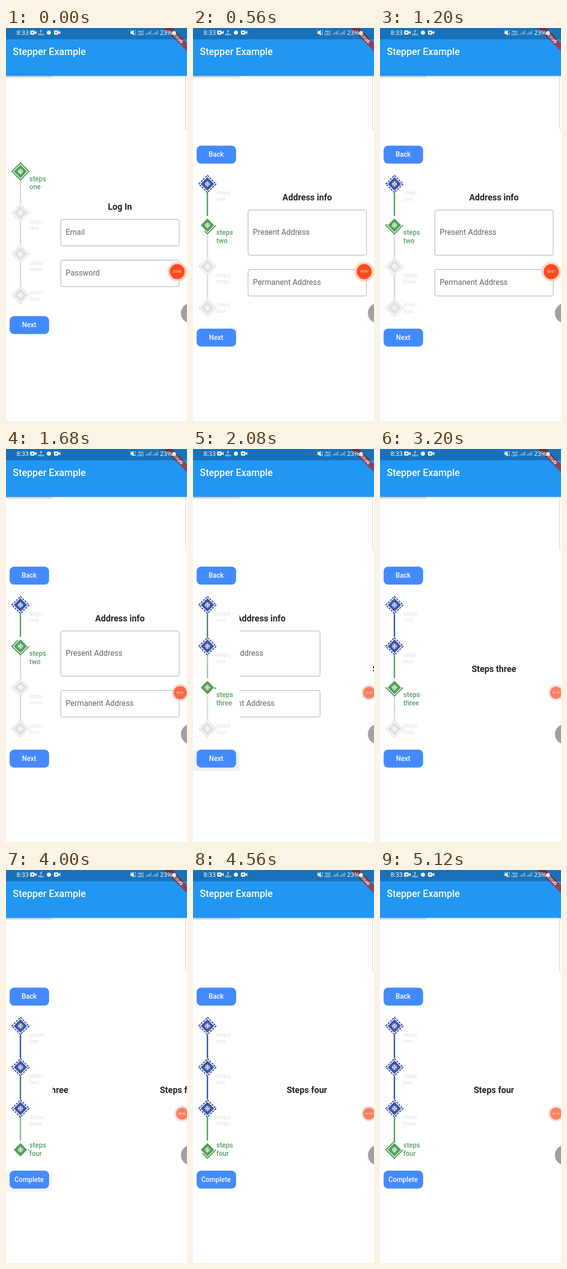
Write an HTML page that moves like this. It is 370 px wide and 800 px high and loops after 5.2 s.

```html
<!DOCTYPE html>
<html lang="en">
<head>
<meta charset="utf-8">
<title>Stepper Example</title>
<style>
  html, body { margin: 0; width: 100%; height: 100%; overflow: hidden; background: #fff; }
  svg { display: block; width: 370px; height: 800px; font-family: Roboto, sans-serif; }
  .heading { font-size: 17.7px; font-weight: 700; text-anchor: middle; fill: #262626; }
  .field rect { fill: none; stroke: #a3a3a3; }
  .field text { font-size: 15.8px; fill: #5f6b64; }
  .button rect { fill: #448aff; }
  .button text { font-size: 13.9px; font-weight: 500; text-anchor: middle; fill: #fff; }
  .label { font-size: 11.5px; fill: #e0e0e0; }
  .label.active { font-size: 13.8px; font-weight: 500; fill: #5c9c66; }
  .tiny { font-size: 5.5px; font-weight: 500; }
</style>
</head>
<body>
<svg viewBox="0 0 370 800">
  <defs>
    <clipPath id="pageArea"><rect x="95" y="98" width="275" height="702"/></clipPath>
    <linearGradient id="shade" x2="0" y2="1">
      <stop stop-color="#bdbdbd"/><stop offset="1" stop-color="#fff"/>
    </linearGradient>
    <g id="snow" fill="none" stroke="#fff" stroke-width="1.8">
      <path id="arm" d="M0 0V-10M-4.7-7.7L0-3L4.7-7.7"/>
      <use href="#arm" transform="rotate(90)"/>
      <use href="#arm" transform="rotate(180)"/>
      <use href="#arm" transform="rotate(270)"/>
    </g>
    <g id="camera">
      <rect y="5" width="9" height="8.5" rx="1.5"/><path d="M8 9.2L13 5.7V12.7Z"/>
      <circle cx="4.5" cy="9.2" r="1.7" fill="#1b74b8"/>
    </g>
    <path id="signal" d="M0 13.5V11.5M2.5 13.5V10M5 13.5V8.5M7.5 13.5V7M10 13.5V5" stroke="#fff" stroke-width="1.2" opacity=".65"/>
  </defs>

  <rect width="370" height="800" fill="#fff"/>
  <path d="M371 97H367V203Q367 207 371 207" fill="none" stroke="#c8c8c8"/>
  <g clip-path="url(#pageArea)"><g id="pages"></g></g>

  <rect id="ripple" y="612" width="95" height="43" rx="3" fill="#ececec"/>
  <g id="back" class="button">
    <rect x="7.4" y="239.6" width="80.7" height="36.5" rx="9"/><text x="47.3" y="262.4">Back</text>
  </g>
  <g id="stepper">
    <g id="steps"></g>
    <g class="button">
      <rect x="7.4" y="612" width="80.7" height="36.5" rx="9"/><text id="next" x="47.3" y="634.8"></text>
    </g>
  </g>

  <rect y="97" width="95" height="6" fill="url(#shade)"/>
  <rect x="95" y="97" width="275" height="1.6" fill="#c3d9ea"/>
  <rect width="370" height="97.4" fill="#2196f3"/>
  <text x="14" y="55" font-size="19.7" font-weight="500" fill="#fff">Stepper Example</text>
  <g transform="translate(370 0) rotate(45)">
    <rect x="-40" y="21.5" width="80" height="12" fill="#b0272c" opacity=".74"/>
    <text y="30.8" font-size="8.8" font-weight="900" text-anchor="middle" fill="#fff">DEBUG</text>
  </g>
  <rect width="370" height="23" opacity=".24"/>

  <g fill="#fff">
    <text x="21.5" y="14" font-size="12.6" font-family="Noto Sans, sans-serif">8:33</text>
    <use href="#camera" x="49.5"/>
    <text class="tiny" x="69.5" y="9" style="font-size:7px">0</text>
    <text class="tiny" x="66" y="15">KB/s</text>
    <circle cx="87.7" cy="9.5" r="4.3"/>
    <use href="#camera" x="98"/>
    <path d="M254.5 7H257L261 4V15L257 12H254.5Z"/>
    <path d="M254 4L264 14.5M263 6L265.5 5M263.5 9.2H266M263 12L265.5 13" stroke="#fff"/>
    <text class="tiny" x="270" y="8.5" style="font-size:6px">Vo))</text>
    <text class="tiny" x="269" y="15" style="font-size:6px">LTE1</text>
    <use href="#signal" x="286"/><use href="#signal" x="300"/>
    <text x="315" y="14" font-size="12.6" font-family="Noto Sans, sans-serif">23%</text>
    <circle cx="343.5" cy="10" r="4" opacity=".85"/>
  </g>

  <circle cx="377.7" cy="580.5" r="20.2" fill="#a0a0a3"/>
  <g id="recorder">
    <circle id="halo" r="20" fill="#fbd5c2"/>
    <circle r="15.3" fill="#ff4a1c"/>
    <text id="clock" y="2.4" font-size="6.7" text-anchor="middle" fill="#fff"></text>
  </g>
</svg>

<script>
const LOOP = 5200, SLIDE = 400, PAGE_WIDTH = 274;
const TAPS = [180, 2005, 3869];
const NAMES = ['one', 'two', 'three', 'four'];
const GREY = [218, 218, 218], GREEN = [82, 160, 88], BLUE = [60, 84, 165];
const RADIUS = 17.4, PERIMETER = RADIUS * 4 * Math.SQRT2;
// Border growth of each active step: [time, share of the outline]
const BORDERS = [
  [[0, 1], [180, 1]],
  [[180, 0], [560, .33], [1200, .53], [2005, .78]],
  [[2005, 0], [2080, .04], [3200, .5], [3869, .77]],
  [[3869, 0], [4000, .02], [5120, .77], [5200, .82]]
];

const byId = id => document.getElementById(id);
const clamp = x => Math.max(0, Math.min(1, x));
const rgb = c => `rgb(${c.map(Math.round)})`;
const mix = (a, b, k) => a.map((v, i) => v + (b[i] - v) * k);
const easeOut = x => 1 - (1 - clamp(x)) ** 2;

function sample(keys, t) {
  const i = Math.max(1, keys.findIndex(k => k[0] >= t));
  const [t0, v0] = keys[i - 1], [t1, v1] = keys[i];
  return v0 + (v1 - v0) * clamp((t - t0) / (t1 - t0));
}

const diamond = r => `M${r} 0L0 ${r}L${-r} 0L0 ${-r}Z`;
const heading = (text, y) => `<text class="heading" x="232.8" y="${y}">${text}</text>`;
const field = (text, y, height) => `<g class="field">
  <rect x="112" y="${y}" width="242" height="${height}" rx="3.5"/>
  <text x="122" y="${y + height / 2 + 4}">${text}</text></g>`;

byId('pages').innerHTML = [
  heading('Log In', 370) + field('Email', 389.5, 54) + field('Password', 472.5, 54),
  heading('Address info', 351) + field('Present Address', 370.5, 92) + field('Permanent Address', 491.5, 54),
  heading('Steps three', 453.5),
  heading('Steps four', 453.5)
].map((page, i) => `<g transform="translate(${i * PAGE_WIDTH})">${page}</g>`).join('');

byId('steps').innerHTML = NAMES.map((name, i) => `
  <g transform="translate(29.5 ${317.5 + 84 * i})">
    ${i < 3 ? '<path class="line" d="M0 19.5V64" stroke-width="2.8" stroke-linecap="round"/>' : ''}
    <path class="border" d="${diamond(RADIUS)}" fill="none" stroke-width="2.4"/>
    <path class="body" d="${diamond(13.7)}"/>
    <use href="#snow" transform="scale(.6)"/>
    <text class="label"><tspan x="18.3">steps</tspan><tspan x="18.3">${name}</tspan></text>
  </g>`).join('');

const steps = [...byId('steps').children].map(g => ({
  line: g.querySelector('.line'), border: g.querySelector('.border'),
  body: g.querySelector('.body'), label: g.querySelector('.label'),
  rows: g.querySelectorAll('tspan')
}));

function drawStep(step, i, current, position, t) {
  const active = i === current;
  const color = rgb(active ? GREEN : i < current ? BLUE : [224, 224, 224]);
  step.body.setAttribute('fill', color);
  step.border.setAttribute('stroke', color);
  step.border.setAttribute('stroke-dasharray',
    active ? `${sample(BORDERS[i], t) * PERIMETER} ${PERIMETER}` : '4 2.15');

  step.label.classList.toggle('active', active);
  const top = (active ? 19.8 : 21.5) - (i === 3 ? 24 : 0);
  step.rows[0].setAttribute('y', top);
  step.rows[1].setAttribute('y', top + (active ? 16.2 : 13.3));

  if (step.line) {
    const done = position - i;
    step.line.setAttribute('stroke', rgb(done < 1
      ? mix(GREY, GREEN, clamp(done)) : mix(GREEN, BLUE, clamp(done - 1))));
  }
}

function render(t) {
  const current = TAPS.filter(tap => t >= tap).length;
  const position = TAPS.reduce((sum, tap) => sum + easeOut((t - tap) / SLIDE), 0);
  const sinceTap = current ? t - TAPS[current - 1] : Infinity;

  byId('pages').setAttribute('transform', `translate(${-position * PAGE_WIDTH})`);
  byId('stepper').setAttribute('transform', `translate(0 ${current ? 0 : -25.5})`);
  byId('back').setAttribute('visibility', current ? 'visible' : 'hidden');
  byId('next').textContent = current === 3 ? 'Complete' : 'Next';
  byId('ripple').setAttribute('opacity', clamp(1 - sinceTap / 250));
  steps.forEach((step, i) => drawStep(step, i, current, position, t));

  const docked = clamp((t - 1500) / 300);
  byId('recorder').setAttribute('transform',
    `translate(${350 + 10 * docked} 496) scale(${1 - .2 * docked})`);
  byId('recorder').setAttribute('opacity', 1 - .3 * docked);
  byId('halo').setAttribute('fill', rgb(mix([251, 213, 194], [225, 215, 203], docked)));
  byId('clock').textContent = `00:0${Math.floor((t + 600) / 1000)}`;
}

const start = performance.now();
function tick() {
  render((performance.now() - start) % LOOP);
  requestAnimationFrame(tick);
}
tick();
</script>
</body>
</html>
```
